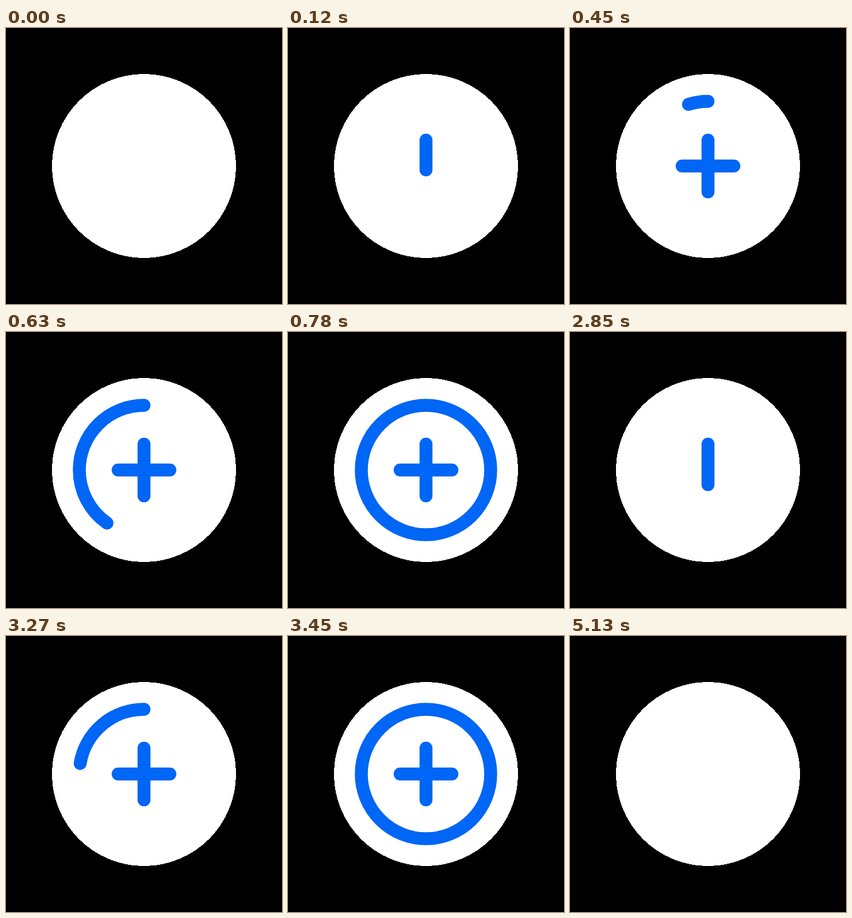
An HTML page that plays this animation: 480 by 480 pixels, repeating every 5400 ms.

```html
<!DOCTYPE html>
<html lang="en">
<head>
<meta charset="utf-8">
<title>Add icon</title>
<style>
  html, body { margin: 0; width: 100%; height: 100%; overflow: hidden; background: #000; }
  svg { display: block; width: 100%; height: 100%; }
  #icon { fill: none; stroke: #0066f5; stroke-width: 22.5; stroke-linecap: round; }
</style>
</head>
<body>
<svg viewBox="0 0 480 480">
  <rect width="480" height="480" fill="#000"/>
  <circle cx="240" cy="240" r="160" fill="#fff" shape-rendering="crispEdges"/>
  <g id="icon">
    <path id="upright" pathLength="1" d="M240 195V285"/>
    <path id="bar" pathLength="1" d="M195 240H285"/>
    <path id="ring" pathLength="1" d="M240 127.5A112.5 112.5 0 0 0 240 352.5A112.5 112.5 0 0 0 240 127.5"/>
  </g>
</svg>
<script>
const LOOP = 5400, CYCLE = 2700, STEP = 30;
const $ = id => document.getElementById(id);
const icon = $('icon');

const easeInOut = s => s * s * (3 - 2 * s);
const easeIn = s => s ** 4;

// Each stroke draws itself between two times of a cycle.
const strokes = [
  { el: $('upright'), from: 10, to: 210, ease: easeInOut },
  { el: $('bar'), from: 170, to: 370, ease: easeInOut },
  { el: $('ring'), from: 191, to: 742, ease: easeIn }
];

function isVisible(t) {
  return (t >= 30 && t < 2400) || (t >= 2730 && t < 5130);
}

function render(ms) {
  const t = Math.floor((ms % LOOP) / STEP) * STEP;
  const local = t % CYCLE;
  icon.style.display = isVisible(t) ? '' : 'none';
  for (const { el, from, to, ease } of strokes) {
    const s = Math.min(1, Math.max(0, (local - from) / (to - from)));
    el.style.display = s > 0 ? '' : 'none';
    el.setAttribute('stroke-dasharray', s < 1 ? `${ease(s)} 2` : 'none');
  }
}

const start = performance.now();
function tick() {
  render(performance.now() - start);
  requestAnimationFrame(tick);
}
tick();
</script>
</body>
</html>
```
